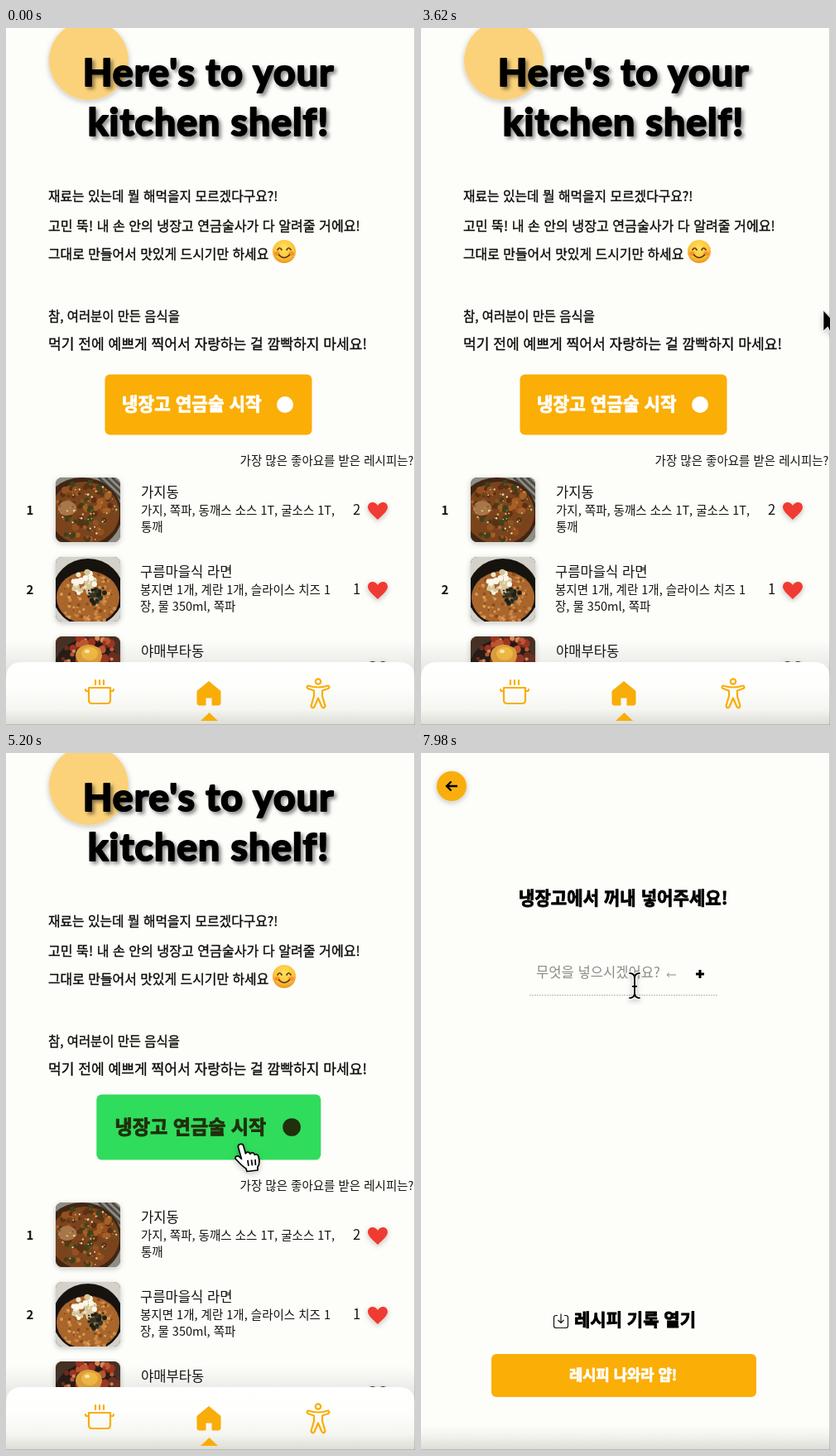
Recreate the animation shown at these times as an HTML page. Size 494 by 842 pixels, loop 8 s.

```html
<!DOCTYPE html>
<html lang="ko">
<head>
<meta charset="utf-8">
<title>Recipe app</title>
<style>
  html, body { margin: 0; width: 100%; height: 100%; overflow: hidden; background: #fdfdfa; }
  svg { display: block; width: 100vw; height: 100vh; }
  text { font-family: "Noto Sans CJK KR", "Noto Sans CJK", "Noto Sans CJK JP", sans-serif; fill: #141412; white-space: pre; }
  .title { font: 700 46.5px Lato, "Open Sans", sans-serif; letter-spacing: 1px; fill: #000; stroke: #000; stroke-width: 2.2; stroke-linejoin: round; text-anchor: middle; }
  .intro { font-weight: 500; fill: #0c0c0a; stroke: #0c0c0a; stroke-width: .35; }
  .bold { font-weight: 700; fill: #000; stroke: #000; stroke-width: .8; stroke-linejoin: round; }
  .white { fill: #fff; stroke: #fff; }
  .name { font-size: 16.6px; }
  .note { font-size: 14.5px; }
  .rank { font-size: 15px; font-weight: 700; }
  .icon { fill: none; stroke: #f9ad08; stroke-width: 2.2; stroke-linecap: round; stroke-linejoin: round; }
</style>
</head>
<body>
<svg viewBox="0 0 494 842" preserveAspectRatio="none">
  <defs>
    <linearGradient id="floor" x1="0" y1="0" x2="0" y2="1">
      <stop offset="0" stop-color="#e9e9e4" stop-opacity="0"/>
      <stop offset="1" stop-color="#dcdcd6"/>
    </linearGradient>
    <linearGradient id="bar" x1="0" y1="0" x2="0" y2="1">
      <stop offset="0" stop-color="#fff"/>
      <stop offset=".4" stop-color="#fefefc"/>
      <stop offset=".75" stop-color="#f5f5f1"/>
      <stop offset="1" stop-color="#dcdcd6"/>
    </linearGradient>
    <linearGradient id="glow" x1="0" y1="0" x2="0" y2="1">
      <stop offset="0" stop-color="#555" stop-opacity="0"/>
      <stop offset="1" stop-color="#555" stop-opacity=".17"/>
    </linearGradient>
    <radialGradient id="face" cx=".5" cy=".35" r=".65">
      <stop offset="0" stop-color="#ffe25e"/>
      <stop offset=".65" stop-color="#fdc43a"/>
      <stop offset="1" stop-color="#ea9420"/>
    </radialGradient>
    <filter id="textShadow" x="-10%" y="-20%" width="120%" height="150%">
      <feDropShadow dx="3" dy="3" stdDeviation="2" flood-color="#000" flood-opacity=".45"/>
    </filter>
    <filter id="soft" x="-30%" y="-30%" width="160%" height="160%">
      <feDropShadow dx="0" dy="2" stdDeviation="3" flood-color="#222" flood-opacity=".25"/>
    </filter>
    <clipPath id="thumb"><rect x="60" y="543" width="78" height="78" rx="8"/></clipPath>
  </defs>

  <rect width="494" height="842" fill="#fdfdfa"/>

  <g id="home">
    <circle cx="100" cy="39" r="48" fill="#fbd27a" filter="url(#soft)"/>
    <g filter="url(#textShadow)">
      <text class="title" x="244.500" y="70">Here's to your</text>
      <text class="title" x="244.500" y="130">kitchen shelf!</text>
    </g>
    <g id="intro"></g>

    <g transform="translate(336 270)">
      <circle r="14" fill="url(#face)"/>
      <ellipse cx="-8.5" cy="2.5" rx="3.4" ry="2.4" fill="#f4722b" opacity=".6"/>
      <ellipse cx="8.5" cy="2.5" rx="3.4" ry="2.4" fill="#f4722b" opacity=".6"/>
      <path d="M-8 -2Q-5.5 -6.5 -3 -2M3 -2Q5.5 -6.5 8 -2M-6.5 4Q0 11 6.5 4" fill="none" stroke="#5d3710" stroke-width="1.7" stroke-linecap="round"/>
    </g>

    <g id="start">
      <rect id="startBox" x="119.500" y="418.500" width="250" height="73" rx="6"/>
      <text id="startText" class="bold" x="140" y="462" font-size="21.3">냉장고 연금술 시작</text>
      <circle id="startDot" cx="337" cy="455" r="10"/>
    </g>

    <text class="note" x="492.500" y="528" text-anchor="end">가장 많은 좋아요를 받은 레시피는?</text>
    <g id="rows"></g>

    <rect y="740" width="494" height="46" fill="url(#glow)"/>
    <path d="M0 842V786Q0 766 20 766H474Q494 766 494 786V842Z" fill="url(#bar)"/>
    <path class="icon" d="M100 797H126V812Q126 816 122 816H104Q100 816 100 812ZM100 801H98Q96 801 96 799M126 801H128Q130 801 130 799M108 788V793M113 788V793M118 788V793"/>
    <path d="M245 789.5L259 801V815.5Q259 818 256.500 818H249V809H241V818H233.500Q231 818 231 815.5V801Z" fill="#f9ad08" stroke="#f9ad08" stroke-linejoin="round"/>
    <path d="M235 837L245.500 827L256 837Z" fill="#f9ad08"/>
    <g class="icon">
      <circle cx="377" cy="789.500" r="3.200"/>
      <path d="M365 794.500Q362 796.500 365 798L372 800.500V807L368.500 819Q370 823 372.500 820L377 809.500L381.500 820Q384 823 385.500 819L382 807V800.500L389 798Q392 796.500 389 794.500Q377 798.500 365 794.500Z"/>
    </g>
  </g>

  <g id="add">
    <circle cx="37" cy="40" r="18" fill="#f9ae08" filter="url(#soft)"/>
    <path d="M44 40H31M36.500 34.500L31 40L36.500 45.500" fill="none" stroke="#000" stroke-width="2.300"/>
    <text class="bold" x="118" y="183" font-size="21.1">냉장고에서 꺼내 넣어주세요!</text>
    <text x="139" y="271" font-size="16.6" font-weight="300" style="fill:#8b8b86">무엇을 넣으시겠어요?</text>
    <path d="M308 268H297M300 265.500L297 268L300 270.500" fill="none" stroke="#8b8b86"/>
    <path d="M332 267H342M337 262V272" stroke="#000" stroke-width="3"/>
    <path d="M131 292.500H359" stroke="#b9b9b2" stroke-dasharray="2 1"/>
    <path d="M165 679.500H163Q160.500 679.500 160.500 682V692Q160.500 694.500 163 694.500H175Q177.500 694.500 177.500 692V682Q177.500 679.500 175 679.500H173M169 677.500V688M165.500 685L169 688.500L172.500 685" fill="none" stroke="#111" stroke-width="1.200"/>
    <text class="bold" x="185" y="692" font-size="21">레시피 기록 열기</text>
    <rect x="85" y="726" width="320" height="52" rx="6" fill="#faae06"/>
    <text class="bold white" x="179" y="758" font-size="17.7">레시피 나와라 얍!</text>
    <rect y="812" width="494" height="30" fill="url(#floor)"/>
  </g>

  <path d="M493.500 0V842M0 841.500H494" stroke="#666" stroke-opacity=".3"/>

  <g id="cursor" filter="url(#soft)">
    <path id="arrow" d="M0 0V25L5.500 20L9.500 29.500L14 27.500L10 18.500H17.500Z" fill="#000" stroke="#fff" stroke-width=".8"/>
    <path id="hand" d="M-3.500 3C-4 -1 2 -2 3 2L5.500 11C6.500 8.500 10 8.500 11 11.500C12.500 9 15.500 9.500 16.500 12.500C18 11 20.500 12 21 14.500C22.500 20 22.500 24 20 27V31L7 32.500L6 29C1 26 -3 21 -6.500 17.500C-8 14.500 -4.500 12.500 -2 15L.5 17.500Z M8 19L9 26M12.500 18.500L13.500 25.500M17 18L17.500 25" fill="#fff" stroke="#000" stroke-width="1.700" stroke-linejoin="round"/>
    <g id="beam" fill="none">
      <path d="M-6.500 -15Q0 -15 0 -9Q0 -15 6.500 -15M0 -9V9M-6.500 15Q0 15 0 9Q0 15 6.500 15M-3 1H3" stroke="#fff" stroke-width="4"/>
      <path d="M-6.500 -15Q0 -15 0 -9Q0 -15 6.500 -15M0 -9V9M-6.500 15Q0 15 0 9Q0 15 6.500 15M-3 1H3" stroke="#000" stroke-width="2"/>
    </g>
  </g>
</svg>

<script>
const $ = id => document.getElementById(id);
const LOOP = 8000, HOVER = 4700, OPEN = 5600;

const intro = [
  [209, 15.8, '재료는 있는데 뭘 해먹을지 모르겠다구요?!'],
  [245, 16.1, '고민 뚝! 내 손 안의 냉장고 연금술사가 다 알려줄 거에요!'],
  [279, 15.9, '그대로 만들어서 맛있게 드시기만 하세요'],
  [354, 15.4, '참, 여러분이 만든 음식을'],
  [388, 17.1, '먹기 전에 예쁘게 찍어서 자랑하는 걸 깜빡하지 마세요!']
];
$('intro').innerHTML = intro.map(([y, size, s]) =>
  `<text class="intro" x="51" y="${y}" font-size="${size}">${s}</text>`).join('');

function seeded(seed) {
  return () => (seed = seed * 16807 % 2147483647) / 2147483647;
}

// Scatters small specks of food inside a disc.
function specks(seed, count, cx, cy, radius, size, colors) {
  const rnd = seeded(seed);
  let out = '';
  for (let i = 0; i < count; i++) {
    const a = rnd() * Math.PI * 2, d = Math.sqrt(rnd()) * radius;
    const x = (cx + Math.cos(a) * d).toFixed(1), y = (cy + Math.sin(a) * d).toFixed(1);
    const r = (size * (.5 + rnd())).toFixed(1);
    out += `<circle cx="${x}" cy="${y}" r="${r}" fill="${colors[Math.floor(rnd() * colors.length)]}"/>`;
  }
  return out;
}

const disc = (x, y, rx, ry, fill) => `<ellipse cx="${x}" cy="${y}" rx="${rx}" ry="${ry}" fill="${fill}"/>`;
const back = fill => `<rect x="60" y="543" width="78" height="78" fill="${fill}"/>`;

const food = [
  back('#8f8d84') + '<path d="M112 543L140 570M120 543L142 564M128 543L140 554" stroke="#4c4a42" stroke-width="3"/>' +
    disc(92, 587, 48, 44, '#3f2614') + disc(95, 586, 42, 38, '#7a431c') +
    specks(71, 90, 97, 583, 38, 3, ['#95501f', '#5d2f14', '#a65f26', '#42401a']) +
    disc(74, 580, 11, 9, '#a87648') +
    specks(19, 80, 99, 585, 36, .9, ['#ecd9a6', '#d6ba7c', '#56682e']),
  back('#d3d1ca') + disc(99, 586, 43, 41, '#16130f') + disc(99, 592, 38, 32, '#a8652c') +
    specks(33, 130, 99, 595, 34, 1.6, ['#cc8844', '#8a4b1c', '#d99c56', '#b4692c']) +
    specks(12, 40, 94, 574, 14, 3, ['#ece4cc', '#faf6ea', '#d8c69a']) +
    specks(8, 34, 108, 588, 12, 2.2, ['#1c2018', '#30352a']),
  back('#453024') + disc(99, 585, 42, 39, '#241812') +
    specks(54, 75, 99, 576, 37, 4, ['#9c3420', '#bd5630', '#6a2c1c', '#d48858']) +
    disc(100, 566, 16, 13, '#e3a03a') + disc(101, 564, 10, 8, '#f6bd40') + disc(98, 561, 3, 2, '#fff0c4')
];

const heart = 'M0 11C-3 8 -12 1 -12 -4C-12 -8 -9 -10 -6.500 -10C-3.500 -10 -1 -8 0 -6C1 -8 3.500 -10 6.500 -10C9 -10 12 -8 12 -4C12 1 3 8 0 11Z';
const rows = [
  ['가지동', '가지, 쪽파, 동깨스 소스 1T, 굴소스 1T,', '통깨', 2, '#f03a32'],
  ['구름마을식 라면', '봉지면 1개, 계란 1개, 슬라이스 치즈 1', '장, 물 350ml, 쪽파', 1, '#f03a32'],
  ['야매부타동', '', '', '', '#4a2a2a']
];
$('rows').innerHTML = rows.map(([name, first, second, likes, color], i) => {
  const x = i === 1 ? 162 : 163;
  return `<g transform="translate(0 ${i * 96})">
    <text class="rank" x="24.5" y="588">${i + 1}</text>
    <rect x="60" y="543" width="78" height="78" rx="8" fill="#554020" filter="url(#soft)"/>
    <g clip-path="url(#thumb)">${food[i]}</g>
    <text class="name" x="${x}" y="567">${name}</text>
    <text class="note" x="${x}" y="588">${first}</text>
    <text class="note" x="${x}" y="608">${second}</text>
    <text class="name" x="419" y="588">${likes}</text>
    <path d="${heart}" transform="translate(449 583)" fill="${color}" filter="url(#soft)"/>
  </g>`;
}).join('');

const clamp = v => Math.max(0, Math.min(1, v));
const ease = v => v * v * (3 - 2 * v);
const mix = (a, b, k) => a + (b - a) * k;
const mixRgb = (a, b, k) => `rgb(${a.map((v, i) => Math.round(mix(v, b[i], k)))})`;

// Pointer hot spot: time, x, y.
const path = [
  [3460, 506, 318], [3620, 486, 341], [4600, 388, 435], [5200, 284, 473],
  [5550, 268, 471], [5900, 265, 470], [6150, 265, 469], [7500, 258, 281]
];

function pointer(t) {
  let i = 0;
  while (i < path.length - 2 && t > path[i + 1][0]) i++;
  const [a, b] = [path[i], path[i + 1]];
  let k = clamp((t - a[0]) / (b[0] - a[0]));
  if (i === path.length - 2) k = ease(k);
  return [mix(a[1], b[1], k), mix(a[2], b[2], k)];
}

const show = (id, on) => $(id).setAttribute('display', on ? 'inline' : 'none');

function draw(t) {
  const home = t < OPEN;
  show('home', home);
  show('add', !home);

  const k = ease(clamp((t - HOVER) / 300));
  const ink = mixRgb([255, 255, 255], [32, 48, 12], k);
  const scale = mix(1, 1.084, k);
  $('start').setAttribute('transform',
    `translate(${244.5 + .3 * k} ${455 - 3 * k}) scale(${scale}) translate(-244.5 -455)`);
  $('startBox').setAttribute('fill', mixRgb([250, 174, 6], [48, 220, 92], k));
  $('startText').style.fill = $('startText').style.stroke = ink;
  $('startDot').setAttribute('fill', ink);

  const [x, y] = pointer(t);
  const hand = home && t >= HOVER, beam = !home && y < 293;
  $('cursor').setAttribute('transform', `translate(${x} ${y})`);
  show('cursor', t >= path[0][0]);
  show('hand', hand);
  show('beam', beam);
  show('arrow', !hand && !beam);
}

const begin = performance.now();
function tick() {
  draw((performance.now() - begin) % LOOP);
  requestAnimationFrame(tick);
}
tick();
</script>
</body>
</html>
```
